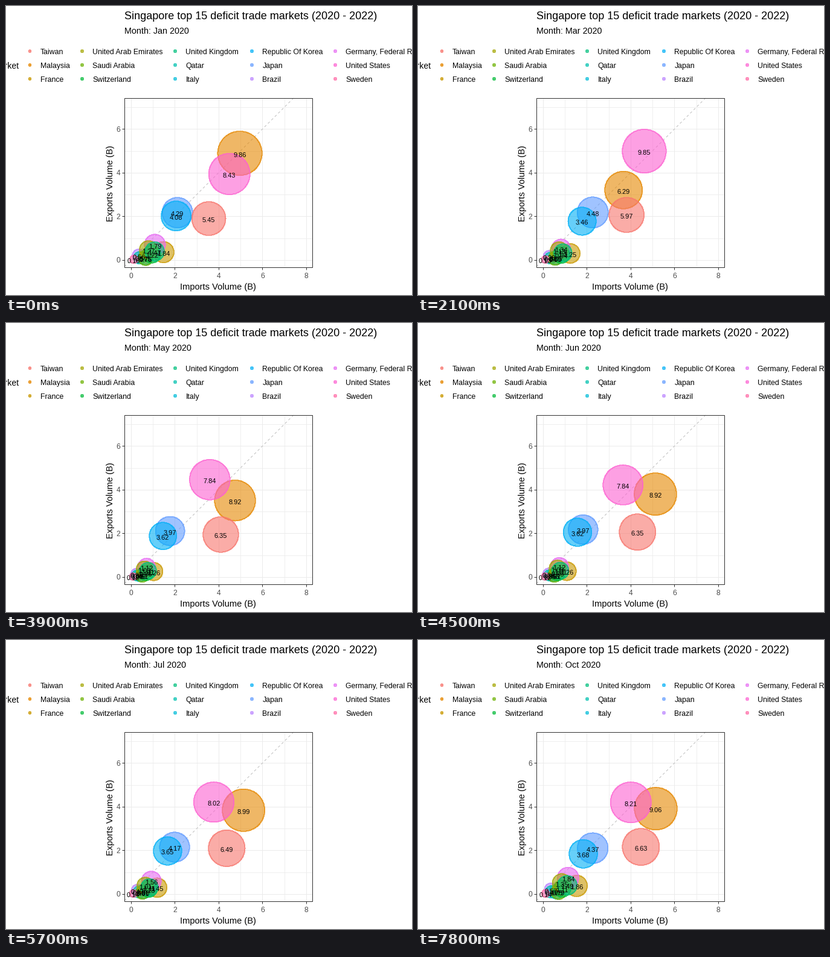
A matplotlib script for the animation above (8 s loop, 672x480 px).

```python
import matplotlib.pyplot as plt
import numpy as np
from matplotlib.animation import FuncAnimation
from matplotlib.colors import to_rgba
from matplotlib.patches import Circle, Rectangle

W, H, DPI = 672, 480, 96
TICKS_PER_STEP = 3                  # ticks of 100 ms
STEPS_PER_MONTH = 99 / 35           # 36 months spread over 100 steps
LEFT, TOP, RIGHT, BOTTOM = 196, 153, 507, 434
X0, Y0, UNIT = 206.9, 421.9, 36.25  # data origin and pixels per billion

MONTHS = "Jan Feb Mar Apr May Jun Jul Aug Sep Oct Nov".split()
MONTH_INDEX = np.arange(len(MONTHS))
MONTH_STEPS = np.round(MONTH_INDEX * STEPS_PER_MONTH)
TURNING_MONTHS = [0, 3, 4, 5, 9]

# (imports, exports): large markets at the turning months, small ones in January.
MARKETS = {
    "Taiwan": [(3.55, 1.90), (3.87, 2.10), (3.70, 1.74), (4.30, 2.05), (4.47, 2.16)],
    "Malaysia": [(4.97, 4.89), (3.42, 2.87), (3.99, 2.94), (5.13, 3.79), (5.15, 3.91)],
    "France": [(1.48, 0.36)],
    "United Arab Emirates": [(0.80, 0.47)],
    "Saudi Arabia": [(0.67, 0.09)],
    "Switzerland": [(0.95, 0.27)],
    "United Kingdom": [(1.08, 0.39)],
    "Qatar": [(0.40, 0.10)],
    "Italy": [(0.64, 0.11)],
    "Republic Of Korea": [(2.06, 2.02), (1.73, 1.73), (1.27, 1.50), (1.55, 2.07), (1.84, 1.84)],
    "Japan": [(2.12, 2.17), (2.30, 2.18), (1.77, 1.96), (1.79, 2.18), (2.27, 2.10)],
    "Brazil": [(0.36, 0.20)],
    "Germany, Federal Republic Of": [(1.09, 0.70)],
    "United States": [(4.49, 3.94), (4.65, 5.20), (3.55, 4.94), (3.62, 4.22), (4.01, 4.20)],
    "Sweden": [(0.13, 0.03)],
}


def monthly_track(points, rng):
    points = np.array(points)
    if len(points) > 1:
        return np.column_stack([np.interp(MONTH_INDEX, TURNING_MONTHS, p) for p in points.T])
    season = 0.85 + 0.15 * np.cos(2 * np.pi * MONTH_INDEX / 9)
    noise = rng.uniform(0.85, 1.15, len(MONTHS))
    noise[0] = 1
    return points * (season * noise)[:, None]


def hcl_color(hue, chroma=100, luminance=65):
    """Polar CIE-LUV to sRGB, as used for evenly spaced plot hues."""
    angle = np.radians(hue)
    u = chroma * np.cos(angle) / (13 * luminance) + 0.1978
    v = chroma * np.sin(angle) / (13 * luminance) + 0.4683
    y = ((luminance + 16) / 116) ** 3
    xyz = y * np.array([9 * u / (4 * v), 1, (12 - 3 * u - 20 * v) / (4 * v)])
    to_rgb = [[3.2405, -1.5371, -0.4985], [-0.9693, 1.8760, 0.0416], [0.0556, -0.2040, 1.0572]]
    rgb = np.clip(to_rgb @ xyz, 0, 1)
    return np.clip(np.where(rgb > 0.00304, 1.055 * rgb ** (1 / 2.4) - 0.055, 12.92 * rgb), 0, 1)


rng = np.random.default_rng(4)
TRACKS = {name: monthly_track(points, rng) for name, points in MARKETS.items()}
COLORS = {name: hcl_color(15 + 360 * i / len(MARKETS)) for i, name in enumerate(MARKETS)}

plt.rcParams["font.family"] = "Liberation Sans"
fig = plt.figure(figsize=(W / DPI, H / DPI), dpi=DPI, facecolor="white")
ax = fig.add_axes([0, 0, 1, 1])
ax.set_xlim(0, W)
ax.set_ylim(H, 0)
ax.axis("off")


def pt(px):
    return px * 72 / DPI


def text(x, y, s, size, color="black", **kw):
    return ax.text(x, y, s, fontsize=pt(size), color=color, **{"va": "baseline", **kw})


def line(xs, ys, color, width=1, **kw):
    ax.plot(xs, ys, color=color, lw=pt(width), solid_capstyle="butt", **kw)


def bubble(x, y, r, color, **kw):
    rgba = to_rgba(color, 0.6)
    return ax.add_patch(Circle((x, y), r, fc=rgba, ec=rgba, lw=pt(1), antialiased=False, **kw))


def px(x):
    return X0 + UNIT * x


def py(y):
    return Y0 - UNIT * y


def radius(total):
    return 3 + 33.6 * np.sqrt(max(total - 0.05, 0) / 9.8)


def draw_panel():
    for v in range(9):
        width = 1 if v % 2 == 0 else 0.8
        line([px(v)] * 2, [TOP, BOTTOM], "#EBEBEB", width, zorder=1)
        if v < 8:
            line([LEFT, RIGHT], [py(v)] * 2, "#EBEBEB", width, zorder=1)
    low, high = (LEFT - X0) / UNIT, (Y0 - TOP) / UNIT
    line([px(low), px(high)], [py(low), py(high)], "#BEBEBE", dashes=(4, 4), zorder=1.5)
    for v in range(0, 9, 2):
        line([px(v)] * 2, [BOTTOM, BOTTOM + 4], "#333333")
        text(px(v), 452, str(v), 12, "#4D4D4D", ha="center")
        if v < 8:
            line([LEFT - 4, LEFT], [py(v)] * 2, "#333333")
            text(189.5, py(v) + 4.5, str(v), 12, "#4D4D4D", ha="right")
    text(351, 471, "Imports Volume (B)", 14.6, ha="center")
    text(179.7, 295, "Exports Volume (B)", 14.6, ha="right", va="center", rotation=90)
    return ax.add_patch(Rectangle((LEFT, TOP), RIGHT - LEFT, BOTTOM - TOP,
                                  fc="none", ec="#333333", lw=pt(1), zorder=5))


def draw_legend():
    text(21.5, 104, "Market", 14, ha="right")
    columns = [39.5, 126, 280, 407, 545]
    for i, (name, color) in enumerate(COLORS.items()):
        x, y = columns[i // 3], 75 + 23 * (i % 3)
        bubble(x, y, 2, color)
        text(x + 17.4, y + 5, name, 12.2)


panel = draw_panel()
draw_legend()
text(195.5, 22, "Singapore top 15 deficit trade markets (2020 - 2022)", 17.95)
subtitle = text(195.5, 46, "", 14.4)

bubbles, labels = {}, {}
for order, name in enumerate(sorted(MARKETS)):
    bubbles[name] = bubble(0, 0, 1, COLORS[name], zorder=2 + order / 100)
    bubbles[name].set_clip_path(panel)
    labels[name] = text(0, 0, "", 11, ha="center", zorder=3 + order / 100)


def update(tick):
    step = tick // TICKS_PER_STEP
    subtitle.set_text(f"Month: {MONTHS[int(step / STEPS_PER_MONTH)]} 2020")
    # Values switch to the coming month halfway there.
    nearest = min(MONTH_INDEX, key=lambda m: (abs(MONTH_STEPS[m] - step), -m))
    for name, track in TRACKS.items():
        x, y = (np.interp(step, MONTH_STEPS, values) for values in track.T)
        bubbles[name].center = px(x), py(y)
        bubbles[name].set_radius(radius(x + y))
        labels[name].set_position((px(x), py(y) + 6))
        labels[name].set_text(f"{round(track[nearest].sum(), 2):g}")
    return [subtitle, *bubbles.values(), *labels.values()]


anim = FuncAnimation(fig, update, frames=80, interval=100, init_func=lambda: update(0),
                     repeat=True, repeat_delay=0, blit=False)
plt.show()
```
